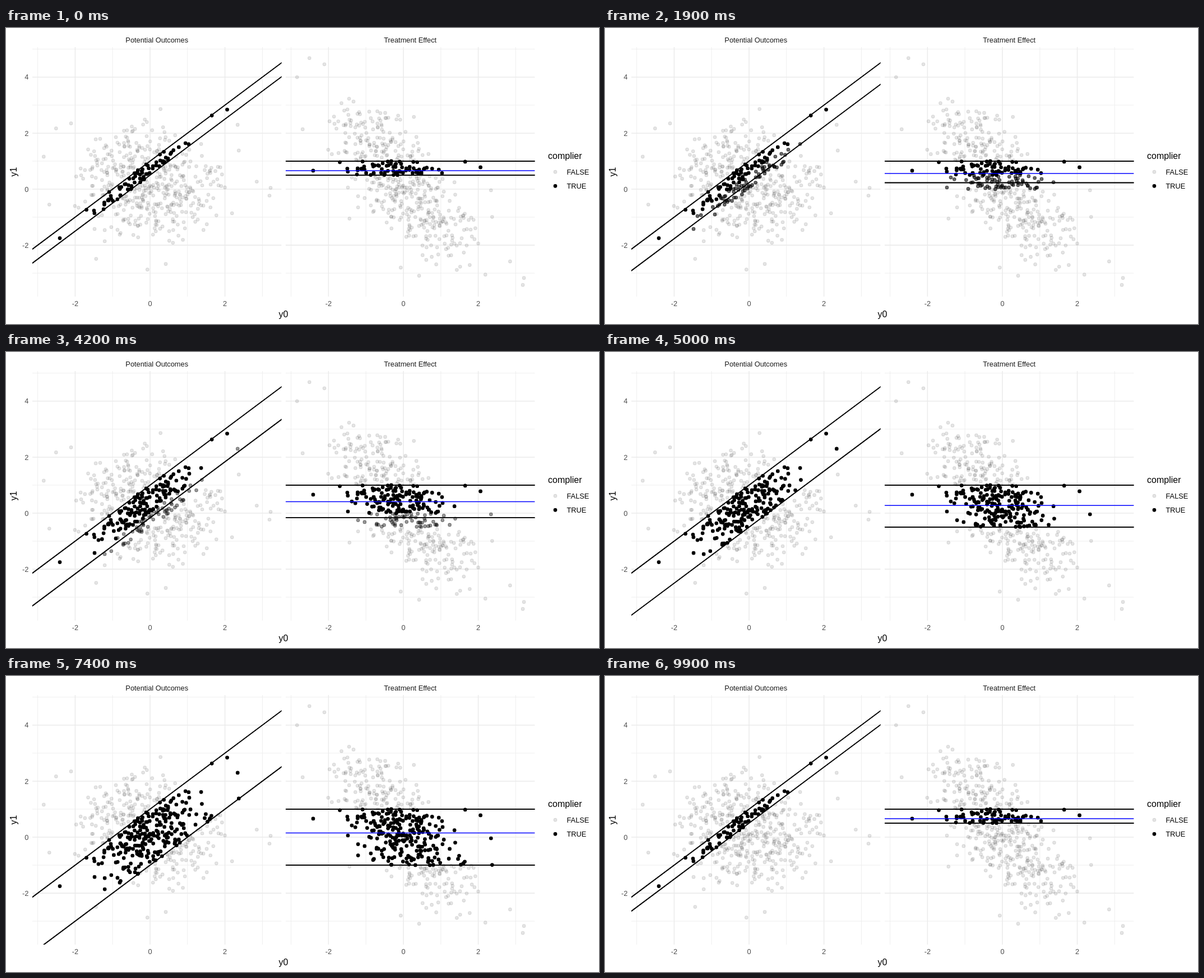
Recreate the animation shown at these times as an HTML page with a canvas. Size 1058 by 529 pixels, loop 10 s.

```html
<!DOCTYPE html>
<html lang="en">
<head>
<meta charset="utf-8">
<title>Compliers</title>
<style>
  html, body { margin: 0; width: 100%; height: 100%; overflow: hidden; background: #fff; }
  canvas { display: block; }
</style>
</head>
<body>
<canvas id="plot" width="1058" height="529"></canvas>
<script>
const ctx = document.getElementById('plot').getContext('2d');
const TOP = 34, BOTTOM = 480, WIDTH = 444.4, UPPER = 1;
const GRID = '#ebebeb', GREY = '#4d4d4d';
const panels = [
  { title: 'Potential Outcomes', left: 47, slope: 1 },
  { title: 'Treatment Effect', left: 499, slope: 0 }
];
const px = (panel, x) => panel.left + 210 + x * 66.8;
const py = y => 288 - y * 50.05;

// Each state: lower bound of the band, mean effect, and the move to the next state.
const states = [
  { lower: 0.5, mean: 0.66, start: 1200, end: 2500 },
  { lower: 0, mean: 0.475, start: 3800, end: 5000 },
  { lower: -0.5, mean: 0.275, start: 6200, end: 7400 },
  { lower: -1, mean: 0.15, start: 8700, end: 9900 }
];

let seed = 41;
function random() {
  seed = (seed + 0x6D2B79F5) | 0;
  let r = Math.imul(seed ^ (seed >>> 15), 1 | seed);
  r = (r + Math.imul(r ^ (r >>> 7), 61 | r)) ^ r;
  return ((r ^ (r >>> 14)) >>> 0) / 4294967296;
}
const normal = () =>
  Math.sqrt(-2 * Math.log(1 - random())) * Math.cos(2 * Math.PI * random());

// The extremes (y0, y1) set the outline; the rest is a normal cloud inside it.
const points = [
  [-2.84, 1.16], [-2.51, 2.17], [-2.11, 2.35], [-2.69, -0.55], [-2.41, -1.75],
  [-0.07, -2.87], [0.42, -2.67], [-1.44, -2.49], [0.28, 2.86], [1.65, 2.63],
  [2.06, 2.84], [2.34, 2.3], [2.37, 1.38], [2.85, 0.27], [3.22, 0.05],
  [3.19, -0.23], [2.19, -0.86]
];
while (points.length < 500) {
  const x = normal(), y = 0.24 + normal();
  if (Math.hypot((x + 0.1) / 2.1, (y - 0.1) / 2.4) < 1) points.push([x, y]);
}

function text(str, x, y, size, color, align = 'left') {
  ctx.font = size + 'px "Liberation Sans", Arial, sans-serif';
  ctx.fillStyle = color;
  ctx.textAlign = align;
  ctx.fillText(str, x, y);
}

function line(x1, y1, x2, y2, color, width = 1.55) {
  ctx.strokeStyle = color;
  ctx.lineWidth = width;
  ctx.beginPath();
  ctx.moveTo(x1, y1);
  ctx.lineTo(x2, y2);
  ctx.stroke();
}

// Fill and outline overlap, which gives faint dots a darker rim.
function dot(x, y, alpha) {
  ctx.fillStyle = ctx.strokeStyle = `rgba(0,0,0,${alpha})`;
  ctx.lineWidth = 1.03;
  ctx.beginPath();
  ctx.arc(x, y, 2.84, 0, 2 * Math.PI);
  ctx.fill();
  ctx.stroke();
}

// A line of the given slope across the whole panel; the clip trims it.
function across(panel, y, color, width, slope = 0) {
  line(px(panel, -4), py(y - 4 * slope), px(panel, 4), py(y + 4 * slope), color, width);
}

function grid(panel) {
  // Odd values are minor lines, even values are major ones.
  for (const parity of [1, 0]) {
    const width = parity ? 0.78 : 1.55;
    for (let v = -4 + parity; v <= 5; v += 2) {
      line(px(panel, v), TOP, px(panel, v), BOTTOM, GRID, width);
      across(panel, v, GRID, width);
    }
  }
}

function labels() {
  for (const panel of panels) {
    text(panel.title, panel.left + WIDTH / 2, 26, 12.8, '#1a1a1a', 'center');
    for (const x of [-2, 0, 2]) text(x, px(panel, x), 497, 12.8, GREY, 'center');
  }
  for (const y of [-2, 0, 2, 4]) text(y, 40.3, py(y) + 4.6, 12.8, GREY, 'right');
  text('y0', 495, 517, 16, '#000', 'center');
  ctx.save();
  ctx.translate(19, 257);
  ctx.rotate(-Math.PI / 2);
  text('y1', 0, 0, 16, '#000', 'center');
  ctx.restore();
  text('complier', 967, 234, 16, '#000');
  text('FALSE', 1000.5, 262, 12.8, '#000');
  text('TRUE', 1000.5, 287, 12.8, '#000');
  dot(980, 257.2, 0.1);
  dot(980, 282.3, 1);
}

function draw(now) {
  const t = Math.floor((now % 10000) / 100) * 100;
  const from = states.find(s => t < s.end) || states[0];
  const to = states[(states.indexOf(from) + 1) % states.length];
  const p = t >= 9900 ? 0 : Math.max(0, (t - from.start) / (from.end - from.start));
  const mix = (a, b) => a + (b - a) * p;
  const alpha = (s, effect) => effect >= s.lower && effect <= UPPER ? 1 : 0.1;

  ctx.fillStyle = '#fff';
  ctx.fillRect(0, 0, 1058, 529);
  for (const panel of panels) {
    ctx.save();
    ctx.beginPath();
    ctx.rect(panel.left, TOP, WIDTH, BOTTOM - TOP);
    ctx.clip();
    grid(panel);
    for (const [x, y] of points) {
      const effect = y - x;
      dot(px(panel, x), py(panel.slope ? y : effect), mix(alpha(from, effect), alpha(to, effect)));
    }
    for (const bound of [mix(from.lower, to.lower), UPPER]) {
      // Stacked strokes harden the edges.
      for (let i = 0; i < 3; i++) across(panel, bound, '#000', 1.55, panel.slope);
    }
    if (!panel.slope) {
      // Leaving compliers keep the old mean until the band has narrowed.
      if (p > 0 && to === states[0]) across(panel, from.mean, '#00f');
      across(panel, mix(from.mean, to.mean), '#00f');
    }
    ctx.restore();
  }
  labels();
  requestAnimationFrame(draw);
}
requestAnimationFrame(draw);
</script>
</body>
</html>
```
